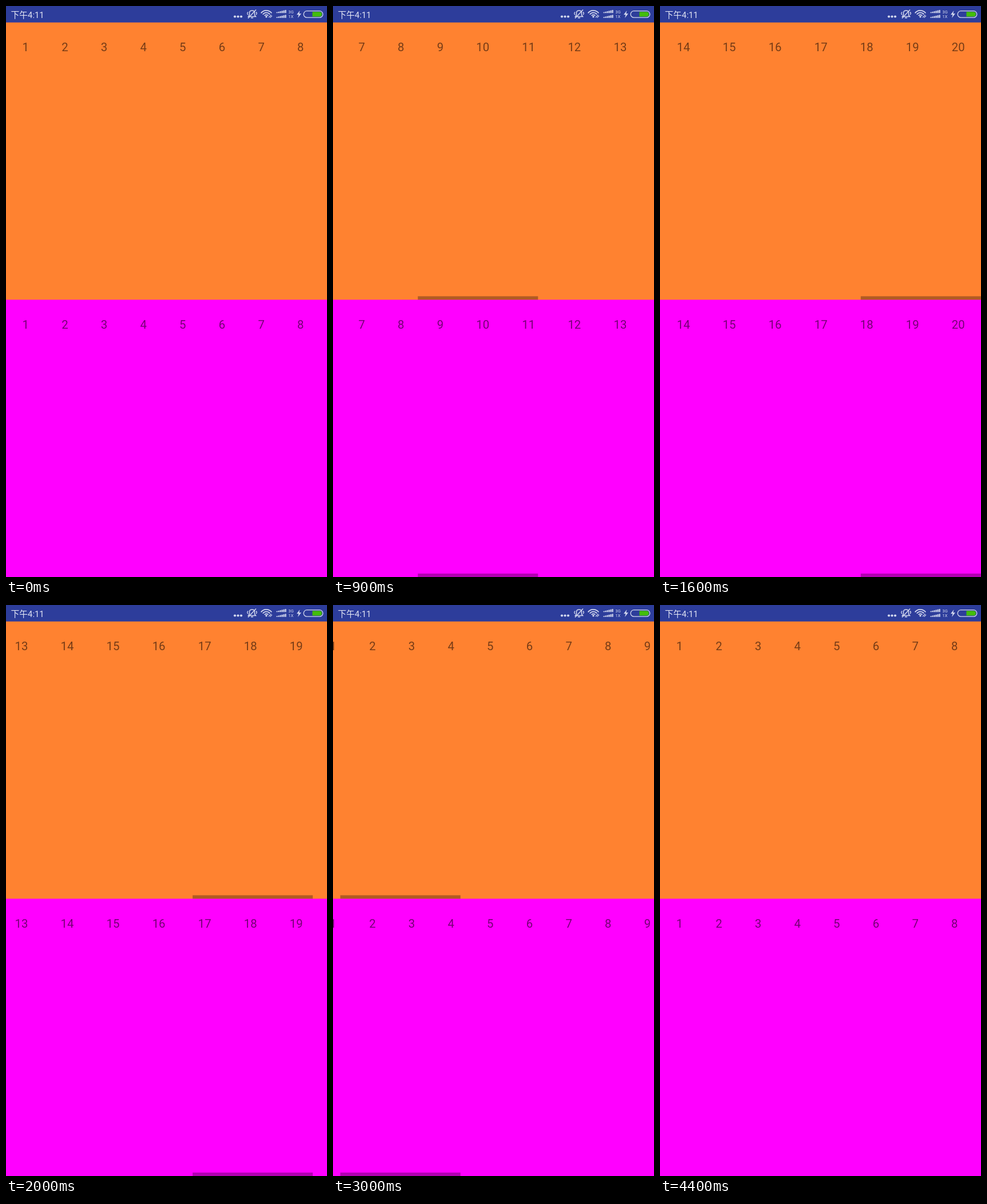
Animation, 561 px wide and 998 px high, one loop 4500 ms. Source, as an HTML page with a canvas:

```html
<!DOCTYPE html>
<html lang="zh">
<head>
<meta charset="utf-8">
<style>
  html, body { margin: 0; width: 100%; height: 100%; overflow: hidden; background: #ff00ff; }
  canvas { display: block; width: 561px; height: 998px; }
</style>
</head>
<body>
<canvas id="stage" width="561" height="998"></canvas>
<script>
const ctx = document.getElementById('stage').getContext('2d');
const W = 561, LOOP = 4500, STEP = 100;
const TOP = 28.6, PANEL = 484.7;
const DIGIT = 11.43, PAD = 28.6, COUNT = 20;
const FONT = 'Roboto, "Noto Sans CJK SC", "Noto Sans CJK", sans-serif';
const ICON = '#d3d8ee';

// Each entry is [time in ms, value]; values between are linear.
const SCROLL = [[200, 0], [300, 10], [500, 105], [900, 396], [1400, 882], [1500, 937],
  [1900, 937], [2000, 871], [3000, 34], [3100, 0]];
const BAR = [[200, 0], [300, 1], [3400, 1], [3700, 0]];
const GLOW_SCALE = [[3100, 0], [3200, 0.32], [3300, 0.443], [3700, 0.25]];
const GLOW_ALPHA = [[3100, 0], [3200, 0.13], [3300, 0.15], [3400, 0.13], [3700, 0]];

function valueAt(keys, t) {
  if (t <= keys[0][0]) return keys[0][1];
  for (let i = 1; i < keys.length; i++) {
    const [t0, a] = keys[i - 1], [t1, b] = keys[i];
    if (t <= t1) return a + (b - a) * (t - t0) / (t1 - t0);
  }
  return keys[keys.length - 1][1];
}

function itemWidth(n) {
  return 2 * PAD + DIGIT * String(n).length;
}

let contentWidth = 0;
for (let n = 1; n <= COUNT; n++) contentWidth += itemWidth(n);

function text(str, x, y, size, color) {
  ctx.font = `${size}px ${FONT}`;
  ctx.fillStyle = color;
  ctx.fillText(str, x, y);
}

function stroke(width, draw) {
  ctx.beginPath();
  draw();
  ctx.lineWidth = width;
  ctx.stroke();
}

function disc(x, y, r) {
  ctx.beginPath();
  ctx.arc(x, y, r, 0, Math.PI * 2);
  ctx.fill();
}

function drawPanel(top, color, scroll, barAlpha) {
  ctx.fillStyle = color;
  ctx.fillRect(0, top, W, PANEL);

  let x = -scroll;
  for (let n = 1; n <= COUNT; n++) {
    if (x < W && x + itemWidth(n) > 0) text(n, x + PAD, top + 50.6, 20.36, 'rgba(0,0,0,.54)');
    x += itemWidth(n);
  }

  ctx.fillStyle = `rgba(0,0,0,${0.3 * barAlpha})`;
  ctx.fillRect(scroll * W / contentWidth, top + PANEL - 6, W * W / contentWidth, 6);
}

// Overscroll glow: a flattened circle bulging from the left edge.
function drawGlow(top, scale, alpha) {
  if (alpha <= 0) return;
  const r = PANEL * 1.5, center = -r * Math.cos(Math.PI / 6);
  ctx.save();
  ctx.beginPath();
  ctx.rect(0, top, W, PANEL);
  ctx.clip();
  ctx.fillStyle = `rgba(63,81,181,${alpha})`;
  ctx.beginPath();
  ctx.ellipse(center * scale, top + PANEL / 2, r * scale, r, 0, 0, Math.PI * 2);
  ctx.fill();
  ctx.restore();
}

function drawBell() {
  stroke(1.5, () => {
    ctx.moveTo(423.5, 18.5);
    ctx.lineTo(425.5, 16);
    ctx.lineTo(425.5, 12);
    ctx.bezierCurveTo(425.5, 6.5, 434.5, 6.5, 434.5, 12);
    ctx.lineTo(434.5, 16);
    ctx.lineTo(436.5, 18.5);
    ctx.closePath();
  });
  stroke(1.5, () => { ctx.moveTo(437, 6.5); ctx.lineTo(423, 21.5); });
  stroke(1.5, () => { ctx.moveTo(428, 20.7); ctx.lineTo(432, 20.7); });
  stroke(1.3, () => ctx.arc(424.5, 13, 2.7, 2, 4.3));
  stroke(1.3, () => ctx.arc(435.5, 13, 2.7, -1.1, 1.1));
}

function drawWifi() {
  for (const r of [4, 7.7, 11.5]) {
    stroke(1.8, () => ctx.arc(455, 19.3, r, -Math.PI * 0.8, -Math.PI * 0.2));
  }
  disc(455, 18.8, 1.7);
  stroke(1.1, () => { ctx.moveTo(459, 20); ctx.lineTo(463.5, 15.5); });
  stroke(1.1, () => { ctx.moveTo(461.5, 20.5); ctx.lineTo(465, 17); });
}

function drawSignal(bottom) {
  for (let i = 0; i < 6; i++) {
    const h = 1.6 + i * 0.75;
    ctx.fillRect(472.5 + i * 3, bottom - h, 2.2, h);
  }
}

function drawBattery() {
  ctx.beginPath();
  ctx.moveTo(513.5, 8);
  ctx.lineTo(508, 15.3);
  ctx.lineTo(511.5, 15.3);
  ctx.lineTo(510, 21);
  ctx.lineTo(516, 13.2);
  ctx.lineTo(512.3, 13.2);
  ctx.closePath();
  ctx.fill();

  stroke(1.3, () => ctx.roundRect(520.2, 8.7, 33.6, 11.4, 5.7));
  ctx.fillStyle = '#43bd0b';
  ctx.beginPath();
  ctx.roundRect(535.5, 10.2, 16.5, 8.4, [0, 4, 4, 0]);
  ctx.fill();
}

function drawStatusBar() {
  ctx.fillStyle = '#2d3d9b';
  ctx.fillRect(0, 0, W, TOP);
  text('下午4:11', 8.5, 20.5, 14.8, '#e2e5f4');
  text('3G', 493.5, 12.7, 7.4, ICON);
  text('1X', 493.5, 21.3, 7.4, ICON);

  ctx.fillStyle = ctx.strokeStyle = ICON;
  for (let i = 0; i < 3; i++) disc(400 + i * 5.5, 18.5, 2.1);
  drawBell();
  drawWifi();
  drawSignal(12.3);
  drawSignal(20.8);
  drawBattery();
}

function render(now) {
  const t = Math.floor((now % LOOP) / STEP) * STEP;
  const scroll = valueAt(SCROLL, t), bar = valueAt(BAR, t);
  drawPanel(TOP + PANEL, '#ff00ff', scroll, bar);
  drawPanel(TOP, '#ff8230', scroll, bar);
  drawGlow(TOP, valueAt(GLOW_SCALE, t), valueAt(GLOW_ALPHA, t));
  drawStatusBar();
}

const start = performance.now();
function tick() {
  render(performance.now() - start);
  requestAnimationFrame(tick);
}
tick();
</script>
</body>
</html>
```
